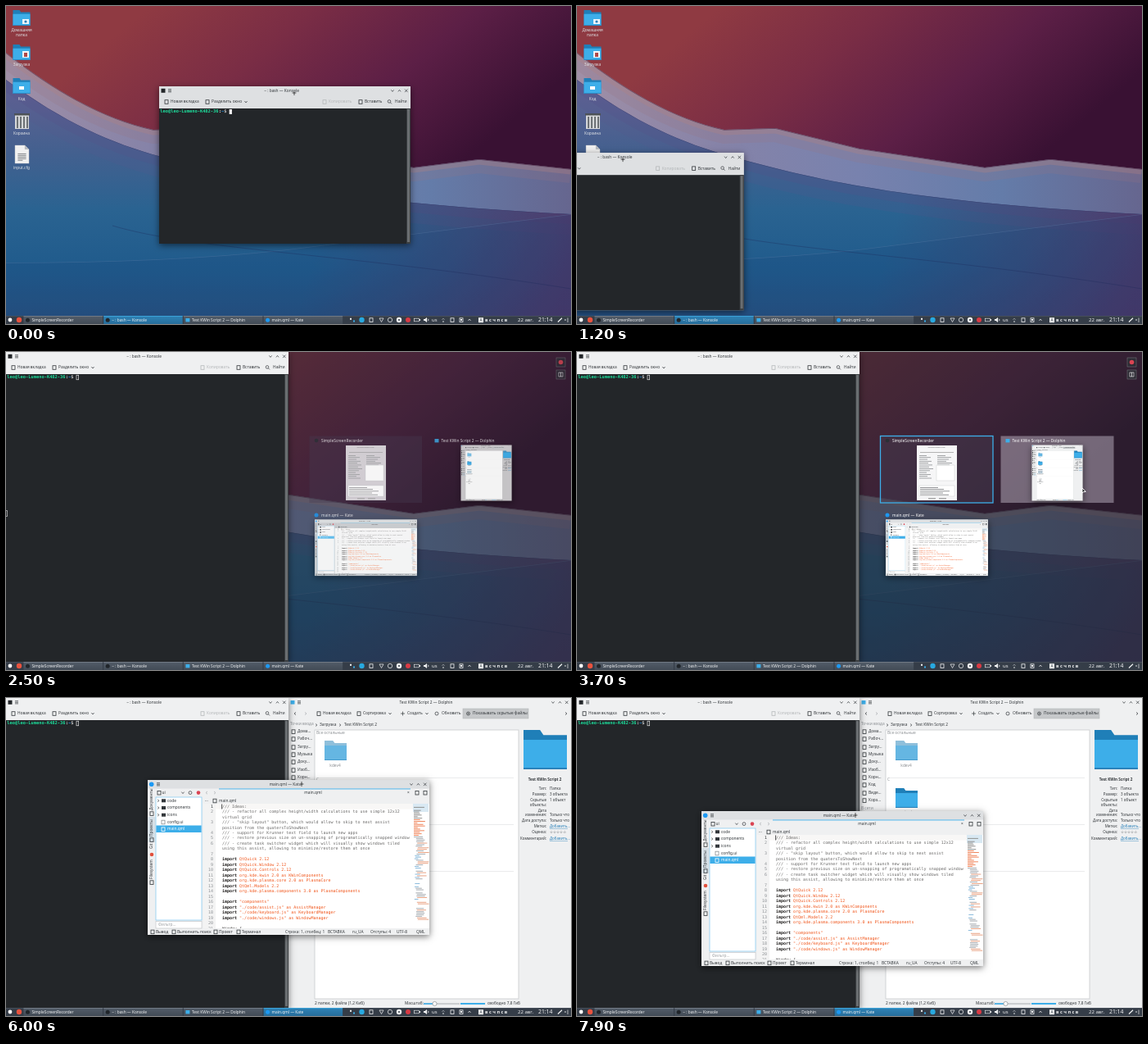
An HTML page with a canvas that plays this animation: 690x388 px, repeating every 8 s.

```html
<!DOCTYPE html>
<html lang="ru">
<head>
<meta charset="utf-8">
<style>
html, body { margin: 0; width: 100%; height: 100%; overflow: hidden; background: #222; }
canvas { display: block; width: 690px; height: 388px; }
</style>
</head>
<body>
<canvas id="stage" width="690" height="388"></canvas>
<script>
const W = 690, H = 388, LOOP = 8000, STEP = 100;
const SANS = '"Noto Sans", sans-serif', MONO = '"DejaVu Sans Mono", monospace';
const INK = '#33373b', GREY = '#8b8f93', BLUE = '#3daee9', PANEL = '#eff0f1';
const view = document.getElementById('stage').getContext('2d');
let g = view;

// ---- drawing helpers
function box(x, y, w, h, fill, stroke, lw = 0.6) {
  if (fill) { g.fillStyle = fill; g.fillRect(x, y, w, h); }
  if (stroke) { g.strokeStyle = stroke; g.lineWidth = lw; g.strokeRect(x, y, w, h); }
}
function text(s, x, y, color = INK, { size = 4.8, align = 'left', bold = '', font = SANS } = {}) {
  g.font = `${bold} ${size}px ${font}`;
  g.textAlign = align;
  g.textBaseline = 'middle';
  g.fillStyle = color;
  g.fillText(s, x, y);
}
function path(points, color, lw = 0.7, fill) {
  g.beginPath();
  points.forEach(([x, y]) => g.lineTo(x, y));
  if (fill) { g.closePath(); g.fillStyle = fill; g.fill(); }
  if (color) { g.strokeStyle = color; g.lineWidth = lw; g.stroke(); }
}
function dot(x, y, r, fill, stroke) {
  g.beginPath();
  g.arc(x, y, r, 0, 7);
  if (fill) { g.fillStyle = fill; g.fill(); }
  if (stroke) { g.strokeStyle = stroke; g.lineWidth = 0.7; g.stroke(); }
}
function chevron(x, y, dx, dy, color = INK) {
  path([[x - dx - dy * 1.6, y - dy - dx * 1.6], [x + dx, y + dy], [x - dx + dy * 1.6, y - dy + dx * 1.6]], color);
}
function icon(x, y, color = INK) { box(x - 2, y - 2.2, 4, 4.6, null, color, 0.8); }
function folder(x, y, w, h) {
  path([[x, y], [x + w * .38, y], [x + w * .46, y + h * .13], [x + w, y + h * .13], [x + w, y + h], [x, y + h]], null, 0, '#1f7fb8');
  box(x, y + h * .25, w, h * .75, BLUE);
  box(x, y + h * .96, w, h * .04, '#2980b9');
}
function page(x, y, w, h) {
  path([[x, y], [x + w * .7, y], [x + w, y + w * .3], [x + w, y + h], [x, y + h]], '#c4c7c9', 0.4, '#f1f1f1');
  path([[x + w * .7, y], [x + w, y + w * .3], [x + w * .7, y + w * .3]], null, 0, '#b8bcc0');
  for (let i = 0; i < 5; i++) box(x + w * .2, y + h * (.45 + i * .09), w * (i == 4 ? .35 : .6), h * .04, '#73777b');
}
function layer(alpha, draw) {
  if (alpha <= 0) return;
  g.save();
  g.globalAlpha *= alpha;
  draw();
  g.restore();
}
function place(x, y, scale, draw) {
  g.save();
  g.translate(x, y);
  g.scale(scale, scale);
  draw();
  g.restore();
}
const ramp = (t, a, b) => Math.min(1, t < a ? 0 : (t - a) / (b - a));
const mix = (a, b, p) => a + (b - a) * p;
// Position along [time, ...values] keys
function at(t, keys) {
  let i = 0;
  while (i < keys.length - 2 && t >= keys[i + 1][0]) i++;
  const [t0, ...from] = keys[i], [t1, ...to] = keys[i + 1];
  return from.map((v, k) => mix(v, to[k], ramp(t, t0, t1)));
}

// ---- wallpaper
function gradient(x0, y0, x1, y1, ...stops) {
  const fill = g.createLinearGradient(x0, y0, x1, y1);
  stops.forEach((c, i) => fill.addColorStop(i / (stops.length - 1), c));
  return fill;
}
// Fills everything under an edge and shades along it
function below(edge, fill, glow = []) {
  g.save();
  g.beginPath();
  edge();
  g.lineTo(W, H);
  g.lineTo(0, H);
  g.closePath();
  g.fillStyle = fill;
  g.fill();
  g.clip();
  for (const [lw, color] of glow) {
    g.beginPath();
    edge();
    g.lineWidth = lw;
    g.strokeStyle = color;
    g.stroke();
  }
  g.restore();
}
function ridge() {
  g.moveTo(0, 57);
  g.bezierCurveTo(55, 100, 115, 137, 180, 151);
  g.lineTo(242, 149);
  g.lineTo(345, 174);
  g.lineTo(498, 197);
  g.lineTo(578, 187);
  g.lineTo(W, 199);
}
function shore() {
  g.moveTo(0, 90);
  g.bezierCurveTo(70, 142, 130, 168, 190, 184);
  g.bezierCurveTo(300, 215, 420, 240, W, 254);
}
function fold() {
  g.moveTo(0, 313);
  g.quadraticCurveTo(200, 313, 345, 297);
  g.lineTo(W, 254);
}
function wallpaper() {
  box(0, 0, W, H, gradient(200, -20, 450, 280, '#8f3a42', '#7a2d45', '#5c1f46', '#391133'));
  below(ridge, gradient(0, 0, W, 0, '#a08fa6', '#8683a8', '#7882ae', '#647ca9', '#66668f'),
    [[34, 'rgba(150,115,130,.22)'], [13, 'rgba(175,130,130,.35)'], [1.5, 'rgba(60,20,50,.5)']]);
  below(shore, gradient(0, 110, 0, H, '#5c6292', '#43608f', '#2a6391', '#205b8c', '#264e7d'),
    [[50, 'rgba(85,85,140,.2)'], [24, 'rgba(85,80,135,.25)'], [1, 'rgba(40,35,80,.4)']]);
  below(shore, gradient(400, 230, W, 320, 'rgba(84,50,95,0)', 'rgba(84,50,95,.35)', 'rgba(84,46,94,.75)'));
  below(fold, 'rgba(20,65,115,.15)', [[1.4, 'rgba(110,140,180,.3)']]);
  g.beginPath();
  g.moveTo(130, 268);
  g.bezierCurveTo(230, 298, 420, 302, W, 345);
  g.lineWidth = 1;
  g.strokeStyle = 'rgba(30,40,90,.35)';
  g.stroke();
}
function desktopIcons() {
  const label = (s, y) => text(s, 19, y, '#dfe2e6', { align: 'center' });
  [5, 47, 88].forEach(y => folder(8.5, y, 21, 19));
  box(20, 16, 8, 6, '#eef4f8');
  dot(24, 19, 1.6, '#2980b9');
  box(20, 55, 8, 8, '#eef4f8');
  box(22, 57, 4, 5, '#b04848');
  box(16, 98, 6, 4, '#fff');
  label('Домашняя', 30); label('папка', 36); label('Загрузка', 72); label('Код', 114);
  box(11, 133, 17, 17, '#d5d7d9');
  for (let x = 13; x < 27; x += 4) box(x, 135, 2, 14, '#6d7276');
  box(10, 131, 19, 2.5, '#4d5257');
  label('Корзина', 156);
  page(11, 170, 17, 22);
  label('input.cfg', 198);
}

// ---- windows
function frame(w, h, title, titleX, active, header = 27) {
  g.save();
  g.shadowColor = 'rgba(0,0,0,.55)';
  g.shadowBlur = 8;
  g.shadowOffsetY = 2;
  box(0, 0, w, h, PANEL);
  g.restore();
  if (active) box(0, 0, w, header, '#dee0e2');
  path([[11, 3.7], [15, 3.7]], INK); path([[11, 5.3], [15, 5.3]], INK); path([[11, 6.9], [15, 6.9]], INK);
  text(title, titleX, 5.4, INK, { align: 'center' });
  chevron(w - 22, 5.4, 0, 1); chevron(w - 13.5, 5.4, 0, -1);
  path([[w - 7, 3.6], [w - 3.5, 7.1]], INK); path([[w - 7, 7.1], [w - 3.5, 3.6]], INK);
}
function konsole(w, h, active, sizing) {
  frame(w, h, '~ : bash — Konsole', w / 2 - 4, active);
  box(2.5, 2.8, 5, 5, '#232629');
  const tools = [['Новая вкладка', 14], ['Разделить окно', 64], ['Копировать', w - 100, '#b5b8ba'], ['Вставить', w - 56]];
  tools.forEach(([s, x, c]) => { icon(x - 5, 18.9, c); text(s, x, 19, c); });
  chevron(106, 19, 0, 1);
  dot(w - 26, 18.4, 1.8, null, INK); path([[w - 24.7, 19.7], [w - 23, 21.4]], INK);
  text('Найти', w - 19, 19);
  box(0, 27, w, h - 27, '#232629');
  box(w - 5, 27, 5, h - 27, '#3a3e41');
  box(w - 4, 28, 3, h - 30, '#6a6e71');
  const mono = { font: MONO, size: 5.4, bold: 'bold' };
  text('leo@leo-Lumeno-K482-36', 1.2, 31, '#1cdc9a', mono);
  text(':', 72.7, 31, '#fcfcfc', mono);
  text('~', 76, 31, '#1d99f3', mono);
  text('$', 79.2, 31, '#fcfcfc', { ...mono, bold: '' });
  if (active) box(85.7, 28, 3.2, 6, '#fcfcfc'); else box(86, 28.2, 2.7, 5.6, null, '#fcfcfc');
  if (!sizing) return;
  box(0, 0, w, h, 'rgba(45,47,51,.34)');
  box(w / 2 - 27, h / 2 + 16, 54, 9.5, '#a6a8ab', '#77797c', 0.5);
  text('Размер: 103 × 54', w / 2, h / 2 + 21, '#232629', { font: MONO, size: 5.3, align: 'center' });
}
function dolphin(active) {
  const w = 345, h = 378;
  frame(w, h, 'Test KWin Script 2 — Dolphin', 168, active);
  box(2.5, 3, 5, 4.6, BLUE);
  chevron(8, 19, -1, 0); chevron(21, 19, 1, 0, '#a9adb0');
  [['Новая вкладка', 42], ['Сортировка', 91]].forEach(([s, x]) => { icon(x - 5, 19); text(s, x, 19); });
  chevron(124, 19, 0, 1);
  path([[137, 19], [142, 19]], INK); path([[139.5, 16.5], [139.5, 21.5]], INK);
  text('Создать', 145, 19); chevron(169, 19, 0, 1);
  dot(181, 19, 2, null, INK); text('Обновить', 187, 19);
  box(213, 13, 80, 12, '#c6c8ca', '#b4b7b9');
  dot(219.5, 19, 2, null, INK); dot(219.5, 19, .8, INK);
  text('Показывать скрытые файлы', 225, 19);
  chevron(339, 19, 1, 0);
  chevron(34, 33, .9, 0); text('Загрузка', 38, 33);
  chevron(63, 33, .9, 0); text('Test KWin Script 2', 68, 33, INK, { bold: '500' });

  [['Точки входа', 32, 1], ['Дома…', 41], ['Рабоч…', 50], ['Загру…', 60], ['Музыка', 69], ['Доку…', 78], ['Изоб…', 88],
    ['Корн…', 97], ['Код', 106], ['Виде…', 116], ['Корз…', 125], ['В сети', 135, 1], ['Сеть', 144], ['Недавно и…', 155, 1],
    ['После…', 164], ['После…', 173], ['Устройства', 184, 1], ['Basic …', 192], ['49,9 Г…', 201]
  ].forEach(([s, y, head]) => {
    text(s, head ? 2 : 11, y, head ? GREY : INK);
    if (!head) icon(6, y);
    if (y > 190) box(11, y + 3, 17, 1, BLUE);
  });

  box(32, 39, 249, 328, '#fff', active ? '#62bdec' : '#c8cbcd', 0.8);
  ['Все остальные', 'C', 'M', 'T'].forEach((s, i) => {
    text(s, 34, 43 + i * 57, GREY);
    if (i) box(34, 40 + i * 57, 241, .5, '#d5d7d8');
  });
  const label = (s, y, c) => text(s, 57, y, c, { align: 'center' });
  layer(.5, () => folder(44, 52, 27, 24)); label('kdev4', 83, GREY);
  folder(44, 110, 27, 24); label('contents', 140);
  for (let i = 0; i < 4; i++) {
    const x = 43 + i % 2 * 15, y = 167 + (i >> 1) * 13;
    box(x, y, 14, 11, '#f4f5f6', '#b7bbbe', 0.4);
    box(x, y, 14, 3, '#34495e');
    box(x, y + 9, 14, 1.5, BLUE);
  }
  label('metadata.desktop', 197); box(38, 200.3, 38, .5, INK);
  page(47, 223, 20, 26); label('Test KWin Script 2.', 254); label('kdev4', 261);

  folder(287, 39, 53, 48);
  text('Test KWin Script 2', 313, 100, INK, { align: 'center', bold: 'bold', size: 4.6 });
  [['Тип:', 110.5, 'Папка'], ['Размер:', 118, '3 объекта'], ['Скрытые', 125, '1 объект'], ['объекты:', 130.5], ['Дата', 137.5],
    ['изменения:', 143, 'Только что'], ['Дата доступа:', 150, 'Только что'], ['Метки:', 157, 'Добавить…'], ['Оценка:', 164, '☆☆☆☆☆'], ['Комментарий:', 172, 'Добавить…']
  ].forEach(([key, y, value = '']) => {
    const link = value[0] == 'Д';
    text(key, 315, y, INK, { align: 'right', size: 4.5 });
    text(value, 319, y, link ? '#2980b9' : INK, { size: 4.5 });
    if (link) box(319, y + 2.6, 22, .4, '#2980b9');
  });
  text('2 папки, 2 файла (1,2 КиБ)', 32, 373);
  text('Масштаб:', 142, 373);
  box(165, 372.3, 44, 1.6, '#c3c6c8'); box(165, 372.3, 13, 1.6, BLUE); dot(178.5, 373, 2.6, '#fcfcfc', GREY);
  box(210, 372, 30, 2, BLUE);
  text('свободно 7,8 ГиБ', 243, 373);
}

const CODE = `/// Ideas:
/// - refactor all complex height/width calculations to use simple 12x12
|virtual grid
/// - "skip layout" button, which would allow to skip to next assist
|position from the quatersToShowNext
/// - support for Krunner text field to launch new apps
/// - restore previous size on un-snapping of programatically snapped window
/// - create task switcher widget which will visually show windows tiled
|using this assist, allowing to minimize/restore them at once

import QtQuick 2.12
import QtQuick.Window 2.12
import QtQuick.Controls 2.12
import org.kde.kwin 2.0 as KWinComponents
import org.kde.plasma.core 2.0 as PlasmaCore
import QtQml.Models 2.2
import org.kde.plasma.components 3.0 as PlasmaComponents

import "components"
import "./code/assist.js" as AssistManager
import "./code/keyboard.js" as KeyboardManager
import "./code/windows.js" as WindowManager

Window {`.split('\n');

function editor() {
  const mono = { font: MONO, size: 5 };
  let number = 0;
  CODE.forEach((line, i) => {
    const y = 32.3 + i * 6.48, wrapped = line[0] == '|';
    if (!wrapped) text(++number, 80, y, number == 1 ? INK : GREY, { ...mono, align: 'right' });
    if (line.startsWith('import')) {
      text('import', 91, y, '#1f1c1b', { ...mono, bold: 'bold' });
      text(line.slice(7), 112.1, y, '#f0551a', mono);
    } else text(line.replace('|', ''), 91, y, i < 9 ? '#6b6a69' : '#1f1c1b', mono);
  });
  box(90.4, 29.5, .7, 6, '#000');
  box(324, 29, 19, 10, '#d9e9f3');
  for (let i = 0; i < 74; i++) {
    const noise = Math.abs(Math.sin(i * 12.9898) * 43758.5) % 1;
    const color = i < 9 ? '#8a8987' : i < 20 ? '#ee7a4c' : noise > .75 ? '#e79a78' : noise > .4 ? '#9ea4aa' : '#7fb4d8';
    if (noise > .12) box(325 + (i > 20 ? noise * 5 : 0), 31 + i * 1.9, 3 + noise * 11, .9, color);
  }
}
function kate() {
  const w = 344, h = 189;
  frame(w, h, 'main.qml — Kate', 168, true, 10.5);
  dot(4.7, 5.3, 2.8, '#1d99f3');
  icon(14, 15.6); text('ui', 17.5, 15.6);
  chevron(43, 15.6, 0, 1); dot(52, 15.6, 1.9, null, INK); dot(62, 15.6, 2.3, '#da4453');
  chevron(72, 15.6, -1, 0, '#a9adb0'); chevron(82, 15.6, 1, 0, '#a9adb0');
  box(87, 10.5, 234, .9, BLUE);
  text('main.qml', 202, 15.8, INK, { align: 'center' });
  text('×', 317, 15.6); icon(329, 15.6); icon(339, 15.6);
  text('…', 70, 25); icon(82, 25.4); text('main.qml', 87, 25.5);

  [['Документы', 37], ['Проекты', 69], ['Git', 84], ['Filesystem', 121]].forEach(([s, y]) => {
    g.save();
    if (s == 'Проекты') box(.5, y - 24, 9, 31, '#d5dfe6');
    g.translate(5, y);
    g.rotate(-Math.PI / 2);
    text(s, 0, 0);
    g.restore();
  });
  icon(5, 41); icon(5, 73); dot(5, 91, 2.3, '#e0503c'); icon(5, 125);
  box(10, 21, 56, 150, '#fff', '#7cc6ef', 0.7);
  box(10.4, 55.5, 55.2, 8.5, BLUE);
  ['code', 'components', 'icons', 'config.ui', 'main.qml'].forEach((s, i) => {
    const y = 25.3 + i * 8.7;
    if (i < 3) { chevron(13, y, .9, 0); box(17, y - 2, 5, 4, INK); } else icon(19, y, i == 4 ? '#fff' : GREY);
    text(s, 24, y, i == 4 ? '#fff' : INK);
  });
  box(10, 172.5, 56, 8.5, '#fff', '#bcc0c3'); text('Фильтр...', 13, 176.8, '#a0a4a7');

  box(68, 29, 276, 152, '#fff');
  box(68, 29, 15, 152, '#f3f3f3');
  box(83, 29, 241, 6.6, '#f8f7f6');
  g.save();
  g.beginPath();
  g.rect(68, 29, 276, 152);
  g.clip();
  editor();
  g.restore();
  [['Вывод', 10], ['Выполнить поиск', 36], ['Проект', 87], ['Терминал', 115], ['Строка: 1, столбец: 1', 168],
    ['ВСТАВКА', 220], ['ru_UA', 250], ['Отступы: 4', 272], ['UTF-8', 304], ['QML', 328]
  ].forEach(([s, x], i) => { if (i < 4) icon(x - 4, 185.3); text(s, x, 185.5); });
}
function recorder() {
  box(0, 0, 49, 67, '#f6f6f7');
  text('SimpleScreenRecorder', 24, 2.5, '#666', { size: 2, align: 'center' });
  box(4, 8, 41, .6, '#888');
  for (let i = 0; i < 13; i++) {
    box(3, 12 + i * 2.3, 9 + i * 5 % 9, .8, '#8c8f92');
    if (i < 6) box(25, 12 + i * 2.3, 10 + i * 7 % 10, .8, '#8c8f92');
  }
  box(24, 24, 22, 19, '#fff', '#c5c7c9', 0.4);
  box(3, 49, 43, 13, '#fff', '#c5c7c9', 0.4);
  for (let i = 0; i < 5; i++) box(4, 51 + i * 2.2, 22 + i * 7 % 15, .8, '#77797c');
  box(14, 64, 9, 1.5, '#aaa'); box(27, 64, 9, 1.5, '#aaa');
}

// ---- window picker and panel
function picker(t) {
  const hover = t >= 3500;
  box(345, 0, 345, 378, 'rgba(35,38,44,.56)');
  box(370.5, 102.5, 137.5, 81.5, 'rgba(70,60,80,.45)', hover ? BLUE : null, 1.3);
  if (hover) box(517.5, 102.5, 138, 81.5, 'rgba(205,195,210,.45)');
  dot(379, 108, 2.3, '#2b3036'); text('SimpleScreenRecorder', 385, 108.3, '#fff');
  box(523.5, 106, 5, 4.4, BLUE); text('Test KWin Script 2 — Dolphin', 531.5, 108.3, '#fff');
  dot(379, 199, 2.5, '#1d99f3'); text('main.qml — Kate', 385, 199.2, '#fff');
  place(415, 114, 1, recorder);
  place(377, 204.5, .363, kate);
  [7, 22].forEach(y => box(672, y, 11, 11, 'rgba(45,48,54,.8)', '#777b80', 0.5));
  dot(677.5, 12.5, 2.8, '#da4453');
  box(675, 25, 5, 5, null, '#fcfcfc'); path([[677.5, 25], [677.5, 30]], '#fcfcfc');
}
function taskbar(active) {
  box(0, 378, W, 10, '#353d48');
  box(0, 378, W, .6, '#525b66');
  dot(5, 383, 2.4, '#fcfcfc');
  dot(16, 383, 3.2, '#e8533f');
  ['SimpleScreenRecorder', '~ : bash — Konsole', 'Test KWin Script 2 — Dolphin', 'main.qml — Kate'].forEach((s, i) => {
    const x = 21.5 + i * 97.7, on = i == active;
    box(x, 378.4, 96.5, 9.6, on ? gradient(0, 378, 0, 388, '#2f83b6', '#266d9b') : gradient(0, 378, 0, 388, '#535d69', '#424b56'));
    box(x, 378.2, 96.5, .8, on ? BLUE : '#7a838d');
    if (i == 2) box(x + 2.5, 381, 5, 4.4, BLUE); else dot(x + 5, 383.2, 2.5, i == 3 ? '#1d99f3' : '#20252a');
    text(s, x + 10, 383.4, '#f2f3f4');
  });
  const white = '#f2f3f4';
  box(420, 380.8, 2, 2, white); box(424, 383.5, 2, 2, BLUE);
  dot(434.5, 383, 3.2, '#28a9e0');
  icon(446, 383, white); path([[456, 381], [461, 381], [458.5, 385.5], [456, 381]], white);
  dot(469, 383, 2.7, null, white); dot(480, 383, 3.2, white); dot(480, 383, 1, '#353d48');
  dot(491, 383, 3, '#da3b45');
  box(498.5, 381.2, 6, 3.6, null, white); box(505, 382, 1, 2, white);
  path([[510, 382], [511.5, 382], [514, 380], [514, 386], [511.5, 384], [510, 384]], null, 0, white);
  chevron(515.5, 383, .8, 0, white);
  text('us', 520, 383.3, white, { size: 6 });
  chevron(534, 382, 0, -1, '#a4a9ae'); dot(534, 385, .8, white);
  icon(545, 383, white); icon(556, 383, white); box(555, 382, 2, 2, white);
  chevron(566, 383, 0, -1, white);
  box(577, 380.2, 6, 6, white); text('А', 580, 383.4, '#353d48', { align: 'center' });
  text('в с ч п с в', 585, 383.4, white, { size: 5.6, bold: 'bold' });
  text('22 авг.', 625, 383.4, white, { size: 6 });
  text('21:14', 650, 383.4, white, { size: 6.8 });
  path([[674, 385.5], [679, 380.8]], white, 1.2);
  dot(683, 383, .8, white); path([[686, 380.5], [686, 386]], white);
}
function pointer(x, y, kind) {
  if (kind == 'arrow') {
    path([[x, y], [x, y + 6], [x + 1.5, y + 4.7], [x + 4.2, y + 4.4]], '#fff', 1, '#1b1e20');
    return;
  }
  for (const [lw, color] of [[2, '#fff'], [.9, '#1b1e20']]) {
    path([[x, y - 3], [x, y + 3]], color, lw);
    if (kind == 'move') path([[x - 2.5, y], [x + 2.5, y]], color, lw);
    else { path([[x - 1.2, y - 3], [x + 1.2, y - 3]], color, lw); path([[x - 1.2, y + 3], [x + 1.2, y + 3]], color, lw); }
  }
}

// ---- timeline
const MOUSE = [[100, 352, 106], [800, 204, 161], [1350, 0.5, 197], [2750, 0.5, 197], [3600, 617, 166], [4250, 617, 166],
  [4600, 526, 181], [5150, 352, 383], [5500, 352, 383], [6000, 361, 105], [6450, 254, 81], [6700, 281, 156],
  [6950, 281, 156], [7400, 254, 81], [7650, 254, 81], [7900, 340, 143]];
const KONSOLE = [[100, 187, 98, 307, 192], [800, 45, 153, 307, 192], [1350, -159, 189, 307, 192], [1600, 0, 0, 345, 378]];
const KATE = [[6000, 173, 100], [6450, 66, 76], [7650, 66, 76], [7900, 152, 138]];

const backdrop = document.createElement('canvas');
backdrop.width = W;
backdrop.height = H;
g = backdrop.getContext('2d');
wallpaper();
desktopIcons();
g = view;

function draw(t) {
  g.drawImage(backdrop, 0, 0);
  const shown = ramp(t, 2100, 2600) * (1 - ramp(t, 3700, 4000));
  layer(shown, () => picker(t));
  if (t >= 2100) {
    const grow = ramp(t, 3700, 4000);
    layer(ramp(t, 2100, 2600), () =>
      place(mix(555.5, 345, grow), mix(113.5, 0, grow), mix(.18, 1, grow), () => dolphin(t > 3700 && t < 5300)));
  }
  const [x, y, w, h] = at(t, KONSOLE);
  place(x, y, 1, () => konsole(w, h, t < 2100, t >= 1400 && t < 1900));
  layer(ramp(t, 5200, 5500), () => place(...at(t, KATE), 1, kate));
  taskbar(t < 2100 ? 1 : t < 3800 ? -1 : t < 5300 ? 2 : 3);
  const dragging = t < 1350 || t >= 6000 && t < 6500 || t >= 7650;
  const typing = t >= 1350 && t < 2750 || t >= 6600 && t < 7200;
  pointer(...at(t, MOUSE), dragging ? 'move' : typing ? 'text' : 'arrow');
}
function tick() {
  draw(Math.floor(performance.now() % LOOP / STEP) * STEP);
  requestAnimationFrame(tick);
}
tick();
</script>
</body>
</html>
```
